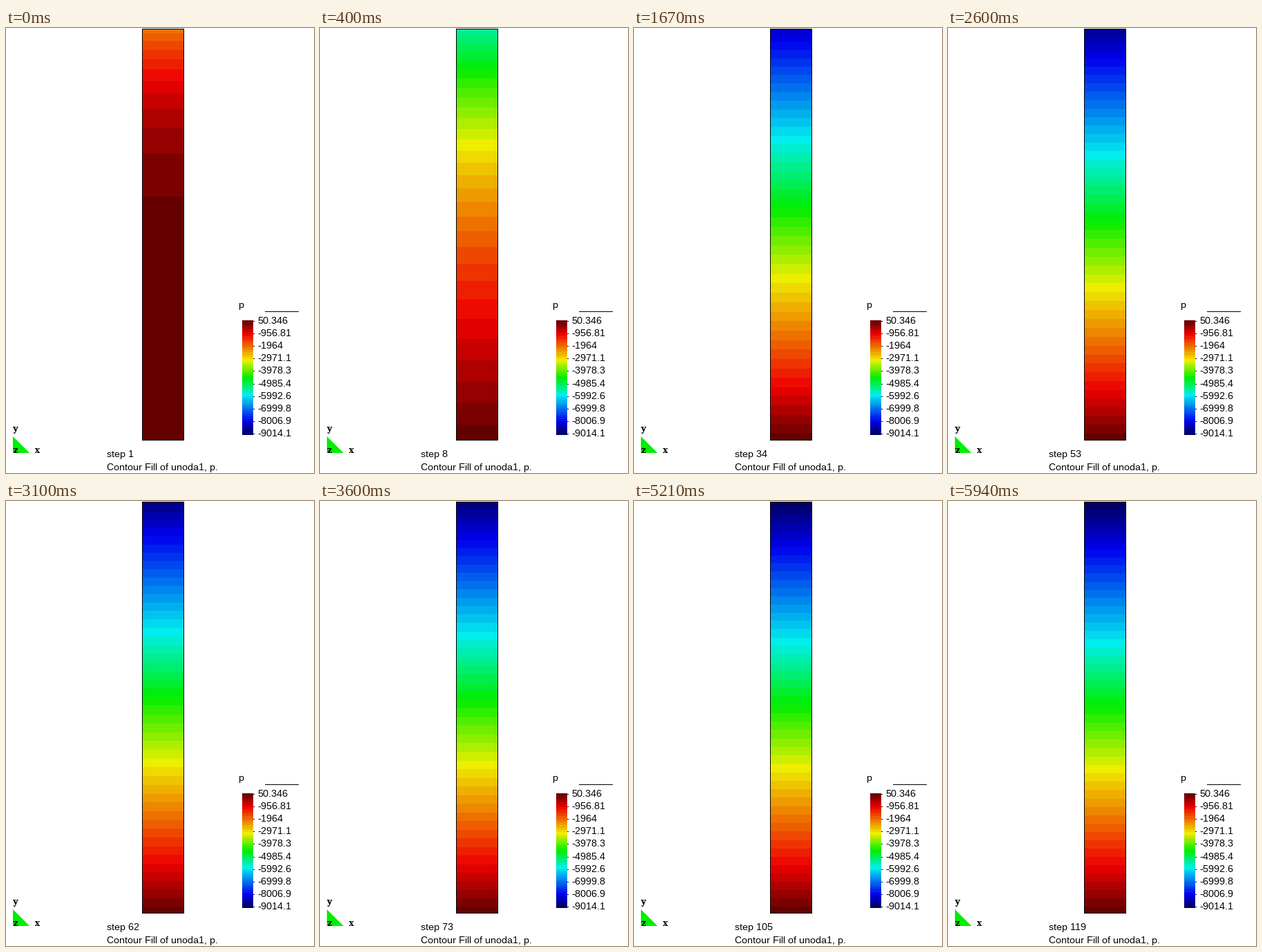
A matplotlib script that plays this animation: 446 px wide and 644 px high, repeating every 5970 ms.

```python
import numpy as np
import matplotlib.pyplot as plt
from matplotlib.animation import FuncAnimation
from matplotlib.patches import Polygon, Rectangle

W, H, DPI = 446, 644, 64
PX = 72 / DPI                      # points per pixel
LOOP, INTERVAL = 5970, 15
STEPS, LEVELS = 119, 50
P_MAX, P_MIN, P_HYDRO = 50.346, -9014.08, 9810
LEFT, RIGHT, TOP, BOTTOM = 198, 257, 2, 596

plt.rcParams.update({
    "font.family": "Liberation Sans",
    "text.hinting": "default",
    "text.hinting_factor": 1,
})


def make_palette():
    """Colours from the highest pressure (dark red) to the lowest (dark blue)."""
    stops = [0, 5.5, 17, 24.5, 32, 43.5, 49]
    rgb = np.array([
        (100, 0, 0), (238, 0, 0), (238, 238, 0), (0, 238, 0),
        (0, 238, 238), (0, 0, 238), (0, 0, 100),
    ])
    levels = np.arange(LEVELS)
    return np.stack([np.interp(levels, stops, c) for c in rgb.T], axis=1) / 255


def diffusion_times():
    """Dimensionless time per step; drainage slows as suction grows."""
    knots = [0, 18, 34, 53, 73, 119]
    rates = [0.0345, 0.020, 0.008, 0.0044, 0.0028, 0.0016]
    mid = np.arange(STEPS) + 0.5
    return np.cumsum(np.exp(np.interp(mid, knots, np.log(rates))))


PALETTE = make_palette()
TAU = diffusion_times()
ROWS = BOTTOM - TOP
HEIGHT = 1 - (np.arange(ROWS) + 0.5) / ROWS
LAM = (np.arange(120) + 0.5) * np.pi
MODES = 2 * (-1.0) ** np.arange(120) / LAM**2 * np.sin(np.outer(HEIGHT, LAM))


def column(step):
    """Banded colours of a draining column: fixed base, sealed top."""
    tau = TAU[step - 1]
    rest = MODES @ np.exp(-LAM**2 * tau)
    skew = 1 - np.exp(-(tau / 0.5) ** 2)
    rest *= 1 + skew * (0.45 * HEIGHT - 0.33)
    p = -P_HYDRO * (HEIGHT - rest)
    band = np.floor((P_MAX - p) / (P_MAX - P_MIN) * LEVELS).astype(int)
    return PALETTE[np.clip(band, 0, LEVELS - 1)][:, None, :]


def step_at(frame):
    tick = int((frame * INTERVAL + 7) * 179 / LOOP)
    return min(tick * 2 // 3 + 1, STEPS)


fig = plt.figure(figsize=(W / DPI, H / DPI), dpi=DPI, facecolor="white")
ax = fig.add_axes([0, 0, 1, 1])
ax.axis("off")


def label(x, y, s, size=14, **kw):
    return ax.text(x, y, s, fontsize=size * PX, color="black",
                   va="baseline", ha="left", **kw)


def bar(x0, x1, y0, y1, data):
    return ax.imshow(data, extent=(x0, x1, y1, y0), aspect="auto",
                     interpolation="nearest")


def box(x0, x1, y0, y1):
    ax.add_patch(Rectangle((x0, y0), x1 - x0, y1 - y0, fc="black", lw=0,
                           zorder=-1))


# Column: the black box behind leaves a one-pixel border
box(LEFT - 1, RIGHT + 1, TOP - 1, BOTTOM + 1)
fill = bar(LEFT, RIGHT, TOP, BOTTOM, column(1))

# Legend
bar(342, 358, 423, 589, PALETTE[:, None, :])
label(336, 405, "p")
box(375, 424, 410, 411)
for i, value in enumerate(np.linspace(P_MAX, P_MIN, 10)):
    y = 424 + i * 163 / 9
    box(358, 360, round(y), round(y) + 1)
    label(364, round(y + 4), f"{value:.5g}")

# Axis triad
ax.add_patch(Polygon([(10, 591), (10, 615), (34, 615)], fc="#00ee00", lw=0))
for x, y, name in [(10, 584, "y"), (10, 615, "z"), (42, 615, "x")]:
    label(x, y, name, 12, family="DejaVu Serif", weight="bold")

# Captions
caption = label(146, 621, "step 1")
label(146, 640, "Contour Fill of unoda1, p.")

ax.set_xlim(0, W)
ax.set_ylim(H, 0)


def draw(frame):
    step = step_at(frame)
    fill.set_data(column(step))
    caption.set_text(f"step {step}")
    return fill, caption


anim = FuncAnimation(fig, draw, frames=LOOP // INTERVAL, interval=INTERVAL,
                     repeat=True)
plt.show()
```
